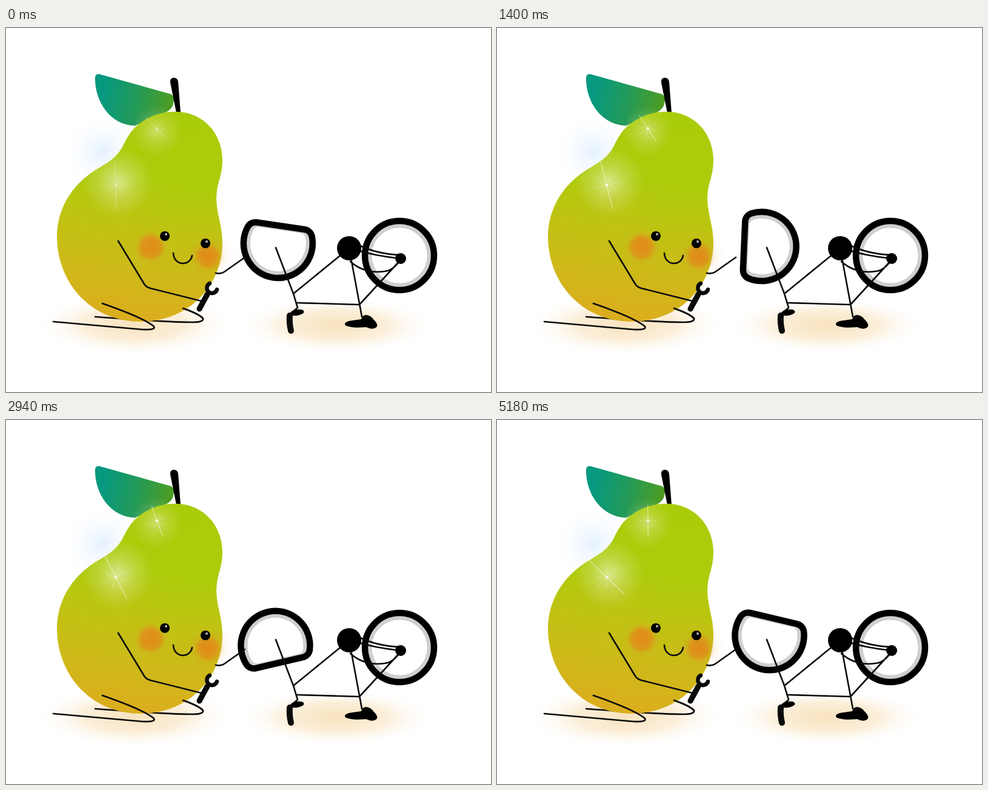
Recreate the animation shown at these times as an HTML page. Size 800 by 600 pixels, loop 5.25 s.

```html
<!DOCTYPE html>
<html lang="en">
<head>
<meta charset="utf-8">
<title>Pear mending a bicycle</title>
<style>
html, body { margin: 0; width: 100%; height: 100%; overflow: hidden; background: #fff; }
svg { display: block; width: 800px; height: 600px; }
.line { fill: none; stroke: #0a0a0a; stroke-width: 2.6; stroke-linecap: round; stroke-linejoin: round; }
.tire { fill: none; stroke: #000; stroke-width: 10.5; }
.rim { fill: none; stroke: #cfcfcf; stroke-width: 7; }
.star { stroke: #fff; stroke-linecap: round; }
</style>
</head>
<body>
<svg viewBox="0 0 800 600">
  <defs>
    <linearGradient id="skin" gradientUnits="userSpaceOnUse" x1="250" y1="138" x2="205" y2="484">
      <stop offset="0" stop-color="#a9cc08"/>
      <stop offset=".35" stop-color="#aecb0b"/>
      <stop offset=".55" stop-color="#bfc312"/>
      <stop offset=".78" stop-color="#cfb919"/>
      <stop offset="1" stop-color="#dcac1e"/>
    </linearGradient>
    <linearGradient id="leaf" gradientUnits="userSpaceOnUse" x1="160" y1="110" x2="272" y2="128">
      <stop offset="0" stop-color="#07997f"/>
      <stop offset=".5" stop-color="#249a58"/>
      <stop offset="1" stop-color="#4c9d22"/>
    </linearGradient>
    <radialGradient id="shine">
      <stop offset="0" stop-color="#fff" stop-opacity=".5"/>
      <stop offset=".5" stop-color="#fff" stop-opacity=".2"/>
      <stop offset="1" stop-color="#fff" stop-opacity="0"/>
    </radialGradient>
    <radialGradient id="cheek">
      <stop offset="0" stop-color="#e08c1a"/>
      <stop offset=".55" stop-color="#e08f1a" stop-opacity=".85"/>
      <stop offset=".75" stop-color="#e08f1a" stop-opacity=".25"/>
      <stop offset="1" stop-color="#f0a050" stop-opacity="0"/>
    </radialGradient>
    <radialGradient id="ground">
      <stop offset="0" stop-color="#f8e3bf"/>
      <stop offset=".5" stop-color="#fbeed8"/>
      <stop offset="1" stop-color="#fff" stop-opacity="0"/>
    </radialGradient>
    <radialGradient id="sky">
      <stop offset="0" stop-color="#e4f1ff"/>
      <stop offset="1" stop-color="#fff" stop-opacity="0"/>
    </radialGradient>
  </defs>

  <ellipse cx="160" cy="205" rx="70" ry="70" fill="url(#sky)"/>
  <ellipse cx="212" cy="488" rx="165" ry="54" fill="url(#ground)"/>
  <ellipse cx="545" cy="490" rx="165" ry="48" fill="url(#ground)"/>

  <!-- pear -->
  <path fill="url(#leaf)" d="M154 76L272 109Q277 112 277 119C276 130 272 135 262 140L213 161C170 160 146 118 147 82Q147 75 154 76Z"/>
  <path d="M271 90Q270 82 277 82Q283 82 284 89L288 140H281Z"/>
  <path class="line" d="M147 476C200 480 270 485 308 485Q326 485 325 479Q320 472 292 462"/>
  <path fill="url(#skin)" d="M283 138C325 140 356 172 357 217C357 245 347 256 347 282C348 310 357 325 357 356C355 430 297 484 222 484C140 484 84 420 84 343C85 290 116 251 156 229C178 216 186 208 194 192C201 178 206 170 216 161C235 145 258 137 283 138Z"/>
  <circle cx="185" cy="254" r="58" fill="url(#shine)"/>
  <circle cx="248" cy="170" r="42" fill="url(#shine)" opacity=".7"/>
  <circle cx="239" cy="361" r="29" fill="url(#cheek)"/>
  <circle cx="333" cy="376" r="27" fill="url(#cheek)"/>
  <circle cx="334" cy="374" r="46" fill="url(#cheek)" opacity=".1"/>
  <g id="stars"></g>
  <circle cx="262" cy="343" r="8"/>
  <circle cx="329" cy="355" r="8"/>
  <g fill="#bbb"><circle cx="264" cy="340" r="2"/><circle cx="331" cy="352" r="2"/></g>
  <path class="line" d="M276 371C277 393 304 393 307 375"/>
  <path class="line" d="M185 351L228 422Q231 427 238 429L322 450M78 484L225 497Q250 498 243 491Q225 477 159 454M292 462Q320 472 325 479"/>
  <path class="line" style="stroke-width:9" d="M319 463L332 439"/>
  <path class="line" style="stroke-width:6.5" d="M336 421A8.5 8.5 0 1 0 348 431"/>

  <!-- bicycle -->
  <g id="front"></g>
  <g id="back" transform="translate(649 375)">
    <circle class="rim" r="49"/>
    <circle class="tire" r="57"/>
  </g>
  <path class="line" d="M346 404Q354 406 360 402L394 378"/>
  <path class="line" d="M445 362L474 438L481 461L467 473M474 438L566 363L587 476M481 453L583 456L651 382M580 357Q612 373 651 374M570 364Q610 376 651 380M568 385Q592 406 625 401Q638 400 651 382"/>
  <circle cx="566" cy="363" r="20"/>
  <circle cx="651" cy="380" r="9"/>
  <ellipse cx="480" cy="469" rx="11.5" ry="5" transform="rotate(-8 480 469)"/>
  <path class="line" style="stroke-width:10" d="M468 474Q467 486 470 499"/>
  <path d="M559 487Q561 483 572 482L586 480Q588 473 594 473Q602 474 606 480Q614 488 612 492Q606 499 594 493Q575 495 565 492Q558 491 559 487Z"/>
</svg>
<script>
const LOOP = 5250, STEP = 70;
const $ = id => document.getElementById(id);

// circle with one flattened side and rounded corners
const flat = "M-39.6-29H39.6A15 15 0 0 1 53.7-19A57 57 0 1 1-53.7-19A15 15 0 0 1-39.6-29Z";
$("front").innerHTML = `<path class="rim" transform="scale(.86)" d="${flat}"/><path class="tire" d="${flat}"/>`;

const star = (x, y, size, turn) => {
  let rays = "";
  for (let i = 0; i < 8; i++) {
    const long = i % 4 === 0 ? 1 : i % 2 ? .45 : .65;
    rays += `<path class="star" transform="rotate(${i * 45})" d="M0 0H${size * long}" stroke-width="${i % 4 ? .7 : 1.1}" opacity="${i % 4 ? .35 : .55}"/>`;
  }
  $("stars").insertAdjacentHTML("beforeend", `<g transform="translate(${x} ${y})"><g>${rays}</g><circle r="2" fill="#fff" opacity=".75"/></g>`);
  const spin = $("stars").lastElementChild.firstElementChild;
  return p => spin.setAttribute("transform", `rotate(${turn(p)})`);
};
const stars = [
  star(181, 259, 40, p => 88 - 45 * p),
  star(249, 166, 26, p => 45 + 45 * p)
];

function draw(now) {
  const p = Math.floor(now % LOOP / STEP) * STEP / LOOP;
  $("front").setAttribute("transform", `translate(445 363) rotate(${8.5 - 360 * p}) translate(2.6 -8.6)`);
  $("stars").setAttribute("opacity", Math.min(1, .5 + p * 3));
  stars.forEach(turn => turn(p));
}
const start = performance.now();
function tick() {
  draw(performance.now() - start);
  requestAnimationFrame(tick);
}
tick();
</script>
</body>
</html>
```
